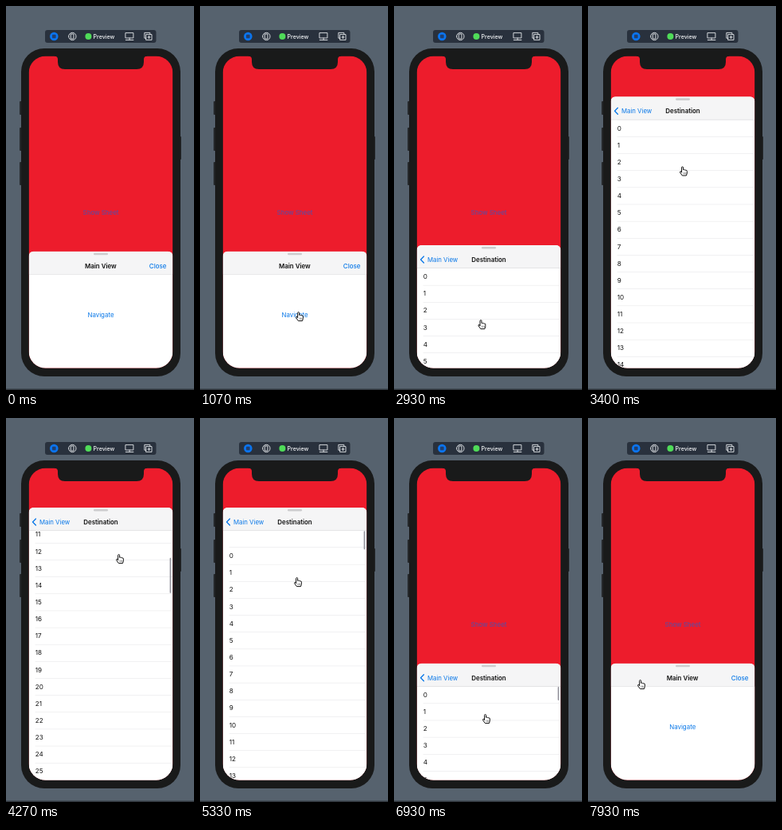
Animation of 236x480 px, one loop 8000 ms. Source, as an HTML page with a canvas:

```html
<!DOCTYPE html>
<html lang="en">
<head>
<meta charset="utf-8">
<title>Sheet preview</title>
<style>
  html, body { margin: 0; width: 100%; height: 100%; overflow: hidden; background: #56626e; }
  canvas { display: block; width: 236px; height: 480px; }
</style>
</head>
<body>
<canvas></canvas>
<script>
const W = 236, H = 480, LOOP = 8000;
const LEFT = 28.6, TOP = 62.6, WIDTH = 180.8, BOTTOM = 452.7, MIDDLE = 119;
const ROW = 21.14, ROWS = 100, BAR_H = 28.5;
const MEDIUM = 306.7, LARGE = 112, MOVE = 640;
const RED = '#ed1c2c', BLUE = '#0a78e8', INK = '#111', BODY = '#191a1a';

const canvas = document.querySelector('canvas');
const ratio = window.devicePixelRatio || 1;
canvas.width = W * ratio;
canvas.height = H * ratio;
const c = canvas.getContext('2d');

const smooth = u => u * u * u * (10 - 15 * u + 6 * u * u);
const out = u => 1 - (1 - u) ** 3;
const ramp = (t, from, to, ease = smooth) => ease(Math.min(1, Math.max(0, (t - from) / (to - from))));

// Critically damped spring used by navigation pushes and pops.
function spring(ms) {
  const s = Math.max(0, ms) * 0.0142;
  return 1 - (1 + s) * Math.exp(-s);
}

const pushAt = t => spring(t - 1600) - spring(t - 7400);
const sheetAt = t => MEDIUM + (LARGE - MEDIUM) * (ramp(t, 2820, 2820 + MOVE) - ramp(t, 6270, 6270 + MOVE));
// Flick up, pull back past the start, bounce to rest.
const scrollAt = t => 242 * ramp(t, 3670, 4470, out) - 263 * ramp(t, 4530, 5330) + 21 * ramp(t, 5400, 5930, out);
const thumbAlphaAt = t => ramp(t, 3670, 3740) - ramp(t, 5700, 6000) + ramp(t, 6270, 6340) - ramp(t, 7130, 7400);

// Pointer stops: arrival time and place.
const stops = [
  { at: 70, x: 195, y: 460 },
  { at: 730, x: 125, y: 388 },
  { at: 2620, x: 110, y: 406 },
  { at: 3460, x: 120, y: 205 },
  { at: 4100, x: 143, y: 176 },
  { at: 5250, x: 123, y: 205 },
  { at: 6910, x: 116, y: 376 },
  { at: 7370, x: 67, y: 333 },
];

function pointerAt(t) {
  const next = stops.findIndex(s => t < s.at);
  if (next < 0) return stops[stops.length - 1];
  const a = stops[next - 1], b = stops[next];
  const p = ramp(t, Math.max(a.at, b.at - MOVE), b.at);
  return { x: a.x + (b.x - a.x) * p, y: a.y + (b.y - a.y) * p };
}

function box(x, y, w, h, r, fill) {
  c.beginPath();
  c.roundRect(x, y, w, h, r);
  c.fillStyle = fill;
  c.fill();
}

function rect(x, y, w, h, fill) {
  c.fillStyle = fill;
  c.fillRect(x, y, w, h);
}

function disc(x, y, r, fill) {
  box(x - r, y - r, 2 * r, 2 * r, r, fill);
}

function clipTo(x, y, w, h, r, paint) {
  c.save();
  c.beginPath();
  c.roundRect(x, y, w, h, r);
  c.clip();
  paint();
  c.restore();
}

function label(text, x, y, { color = INK, align = 'left', weight = 400, size = 7.9, alpha = 1 } = {}) {
  c.globalAlpha = alpha;
  c.font = `${weight} ${size}px Inter, "Open Sans", sans-serif`;
  c.textAlign = align;
  c.fillStyle = color;
  c.fillText(text, x, y + 2.9);
  c.globalAlpha = 1;
}

function line(path, color, width = 1) {
  c.strokeStyle = color;
  c.lineWidth = width;
  c.lineCap = c.lineJoin = 'round';
  c.stroke(new Path2D(path));
}

function drawToolbar() {
  const icon = '#e4e7ea';
  box(49, 30, 139.5, 16, 3, '#29313d');
  disc(60.3, 38, 5.3, '#0b74ee');
  box(58, 35.7, 4.6, 4.6, 1, '#203f70');
  line('M78.6 38a4.7 4.7 0 1 0 9.4 0a4.7 4.7 0 1 0 -9.4 0M81.7 35h3.2v6h-3.2z', icon, 0.9);
  disc(103.4, 38, 4, '#4fdc58');
  label('Preview', 109.6, 38, { color: '#f4f6f8', size: 7, weight: 500 });
  line('M150.3 33.6h9.6v6.4h-9.6zM155.1 40v2.4M150.3 42.5h9.6', icon, 0.9);
  line('M176 35.6h7v6.8h-7zM176 40.2h-2.2v-6.8h7v2.2M179.5 37.4v3.2M177.9 39h3.2', icon, 0.9);
}

function drawPhone() {
  for (const [x, y, h] of [[17, 119, 17], [17, 152, 29], [17, 195, 29], [217, 163, 29]]) box(x, y, 3, h, 1, '#25282b');
  box(19, 53, 200, 410, 29, BODY);
}

function drawNotch() {
  c.fillStyle = BODY;
  c.fill(new Path2D('M61 62h116v.8q-4 0-4 4v3.2q0 9-9 9h-90q-9 0-9-9v-3.2q0-4-4-4z'));
}

function drawList(left, top, scroll, thumbAlpha) {
  const view = BOTTOM - top;
  clipTo(left, top, WIDTH, view, 0, () => {
    rect(left, top, WIDTH, view, '#fff');
    const separator = y => rect(left + 8, y, WIDTH, 0.5, '#e3e3e5');
    separator(top - scroll);
    for (let i = 0; i < ROWS; i++) {
      const y = top + 10.8 + i * ROW - scroll;
      label(i, left + 8.2, y, { size: 8.1 });
      separator(y + ROW / 2);
    }
    const scale = (view - 14) / (ROWS * ROW);
    const thumb = Math.max(17, view * scale + Math.min(0, scroll));
    c.globalAlpha = thumbAlpha;
    box(left + 177, top + 0.7 + Math.max(0, scroll) * scale, 1.7, thumb, 0.85, '#96969f');
  });
}

function drawHeader(top, p) {
  const y = top + 18, q = 1 - p, backX = 42 + 57 * q;
  rect(LEFT, top, WIDTH, BAR_H, '#f5f5f6');
  rect(LEFT, top + BAR_H, WIDTH, 0.5, '#d4d4d6');
  box(MIDDLE - 9, top + 2, 18, 2.6, 1.3, '#cdcdcf');
  label('Main View', backX, y, { weight: 600, alpha: q });
  label('Main View', backX, y, { color: BLUE, size: 7.8, alpha: p });
  label('Close', 201.3, y, { color: BLUE, weight: 500, align: 'right', alpha: q });
  label('Destination', MIDDLE + 100 * q, y, { weight: 600, align: 'center', alpha: p });
  c.globalAlpha = p;
  line(`M37.4 ${y - 4}l-3.9 4l3.9 4`, BLUE, 1.3);
  c.globalAlpha = 1;
}

function drawSheet(t) {
  const top = sheetAt(t), content = top + BAR_H, p = pushAt(t);
  clipTo(LEFT, top, WIDTH, BOTTOM - top + 20, 6, () => {
    rect(LEFT, top, WIDTH, BOTTOM - top, '#fff');
    label('Navigate', MIDDLE - 54 * p, top + 79, { color: BLUE, align: 'center' });
    rect(LEFT, content, WIDTH, BOTTOM - content, `rgba(0,0,0,${0.1 * p})`);
    if (p > 0.001) drawList(LEFT + WIDTH * (1 - p), content, scrollAt(t), thumbAlphaAt(t));
    drawHeader(top, p);
  });
}

function drawPointer(t) {
  if (t < stops[0].at) return;
  const { x, y } = pointerAt(t);
  c.save();
  c.translate(x, y);
  const hand = 'M-2.4 1.4V-4.4a1 1 0 0 1 2 0V-1.6q1-.7 1.7.2q1-.5 1.6.4q1.5-.4 1.5 1.2V2.6L3.5 5.6H-1.6L-4.3 1.8q-.6-1.4.6-1.5z';
  c.fillStyle = '#fff';
  c.fill(new Path2D(hand));
  line(hand, '#111');
  line('M-.1 2v1.7M1.5 2v1.7M3 2v1.7', '#333', 0.5);
  c.restore();
}

function draw(t) {
  c.setTransform(ratio, 0, 0, ratio, 0, 0);
  rect(0, 0, W, H, '#56626e');
  rect(0, 478.5, W, 1.5, '#30363c');
  drawToolbar();
  drawPhone();
  clipTo(LEFT, TOP, WIDTH, BOTTOM - TOP, 21, () => {
    rect(LEFT, TOP, WIDTH, BOTTOM - TOP, RED);
    label('Show Sheet', MIDDLE, 258, { color: '#66489a', weight: 500, align: 'center' });
    drawSheet(t);
  });
  drawNotch();
  drawPointer(t);
}

const start = performance.now();
function tick() {
  draw((performance.now() - start) % LOOP);
  requestAnimationFrame(tick);
}
tick();
</script>
</body>
</html>
```
